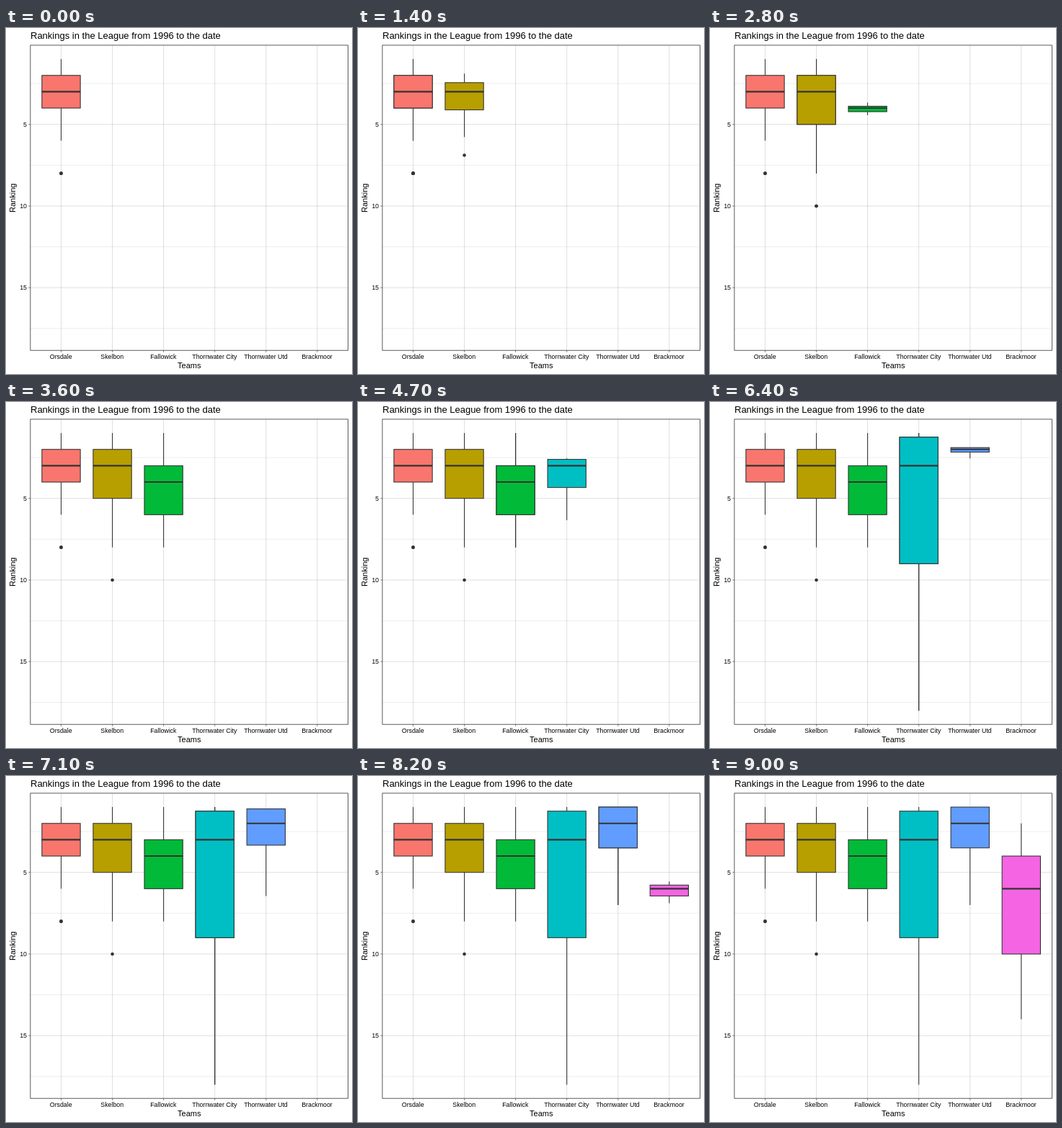
Write an HTML page with a canvas that moves like this. It is 480x480 px and loops after 10 s.

```html
<!DOCTYPE html>
<html lang="en">
<head>
<meta charset="utf-8">
<title>Rankings</title>
<style>
html, body { margin: 0; width: 100%; height: 100%; overflow: hidden; background: #fff; }
canvas { display: block; width: 480px; height: 480px; }
</style>
</head>
<body>
<canvas id="stage"></canvas>
<script>
const LOOP = 10000, CYCLE = 1800, HOLD = 1000, STEP = 100, STEPS = 9;
const FONT = '"Liberation Sans", Arial, sans-serif';
const INK = '#333333';
const panel = { left: 33.85, right: 474.45, top: 23.9, bottom: 447.2 };
const gap = (panel.right - panel.left) / 6.2;
const colX = i => panel.left + gap * (0.6 + i);
const rankY = v => 133.7 + 22.65 * (v - 5);

const teams = [
  { name: 'Orsdale', fill: '#F8766D', low: 1, q1: 2, mid: 3, q3: 4, high: 6, dots: [8, 8] },
  { name: 'Skelbon', fill: '#B79F00', low: 1, q1: 2, mid: 3, q3: 5, high: 8, dots: [10] },
  { name: 'Fallowick', fill: '#00BA38', low: 1, q1: 3, mid: 4, q3: 6, high: 8, dots: [] },
  { name: 'Thornwater City', fill: '#00BFC4', low: 1, q1: 1.25, mid: 3, q3: 9, high: 18, dots: [] },
  { name: 'Thornwater Utd', fill: '#619CFF', low: 1, q1: 1, mid: 2, q3: 3.5, high: 7, dots: [] },
  { name: 'Brackmoor', fill: '#F564E3', low: 2, q1: 4, mid: 6, q3: 10, high: 14, dots: [] }
];

const canvas = document.getElementById('stage');
const ctx = canvas.getContext('2d');
const ratio = window.devicePixelRatio || 1;
canvas.width = canvas.height = 480 * ratio;

function line(x1, y1, x2, y2, color, width) {
  ctx.strokeStyle = color;
  ctx.lineWidth = width;
  ctx.beginPath();
  ctx.moveTo(x1, y1);
  ctx.lineTo(x2, y2);
  ctx.stroke();
}

function text(str, x, y, size, align) {
  ctx.font = size + 'px ' + FONT;
  ctx.textAlign = align;
  ctx.fillStyle = '#000';
  ctx.fillText(str, x, y);
}

function drawGrid() {
  const { left, right, top, bottom } = panel;
  const major = 'rgba(0,0,0,0.13)', minor = 'rgba(0,0,0,0.075)';
  for (let v = 2.5; v < 18; v += 2.5) {
    line(left, rankY(v), right, rankY(v), v % 5 ? minor : major, 1);
  }
  teams.forEach((t, i) => line(colX(i), top, colX(i), bottom, major, 1));
}

function drawFrame() {
  const { left, right, top, bottom } = panel;
  ctx.strokeStyle = INK;
  ctx.lineWidth = 0.8;
  ctx.strokeRect(left, top, right - left, bottom - top);
  for (const v of [5, 10, 15]) {
    line(left - 2.75, rankY(v), left, rankY(v), INK, 0.6);
    text(String(v), 29, rankY(v) + 3.2, 8.8, 'right');
  }
  teams.forEach((t, i) => {
    line(colX(i), bottom, colX(i), bottom + 2.75, INK, 0.6);
    text(t.name, colX(i) - 0.3, 459, 8.8, 'center');
  });
  text('Rankings in the League from 1996 to the date', 34, 15, 13, 'left');
  text('Teams', 254.3, 472, 11, 'center');
  ctx.save();
  ctx.translate(13, 235.8);
  ctx.rotate(-Math.PI / 2);
  text('Ranking', 0, 0, 11, 'center');
  ctx.restore();
}

// Every part spreads out from the median as grow goes from 0 to 1.
function drawBox(i, grow) {
  const t = teams[i], x = colX(i), half = gap * 0.375;
  const at = v => rankY(t.mid + (v - t.mid) * grow);
  ctx.fillStyle = INK;
  for (const v of t.dots) {
    ctx.beginPath();
    ctx.arc(x, at(v), 2.3, 0, Math.PI * 2);
    ctx.fill();
  }
  line(x, at(t.q1), x, at(t.low), INK, 1.07);
  line(x, at(t.q3), x, at(t.high), INK, 1.07);
  const y = at(t.q1), h = at(t.q3) - y;
  ctx.fillStyle = t.fill;
  ctx.fillRect(x - half, y, half * 2, h);
  ctx.strokeStyle = INK;
  ctx.lineWidth = 1.07;
  ctx.strokeRect(x - half, y, half * 2, h);
  line(x - half, at(t.mid), x + half, at(t.mid), INK, 2.13);
}

function draw(ms) {
  const stage = Math.floor(ms / CYCLE);
  const since = ms - stage * CYCLE - HOLD;
  const step = since < 0 ? 0 : Math.floor(since / STEP) + 1;

  ctx.setTransform(ratio, 0, 0, ratio, 0, 0);
  ctx.fillStyle = '#fff';
  ctx.fillRect(0, 0, 480, 480);
  drawGrid();
  for (let i = 0; i <= stage; i++) drawBox(i, 1);
  if (step > 0 && stage + 1 < teams.length) {
    drawBox(stage, 1); // the latest box is doubled while the next one grows
    drawBox(stage + 1, step / STEPS);
  }
  drawFrame();
}

const start = performance.now();
function tick() {
  draw((performance.now() - start) % LOOP);
  requestAnimationFrame(tick);
}
tick();
</script>
</body>
</html>
```
